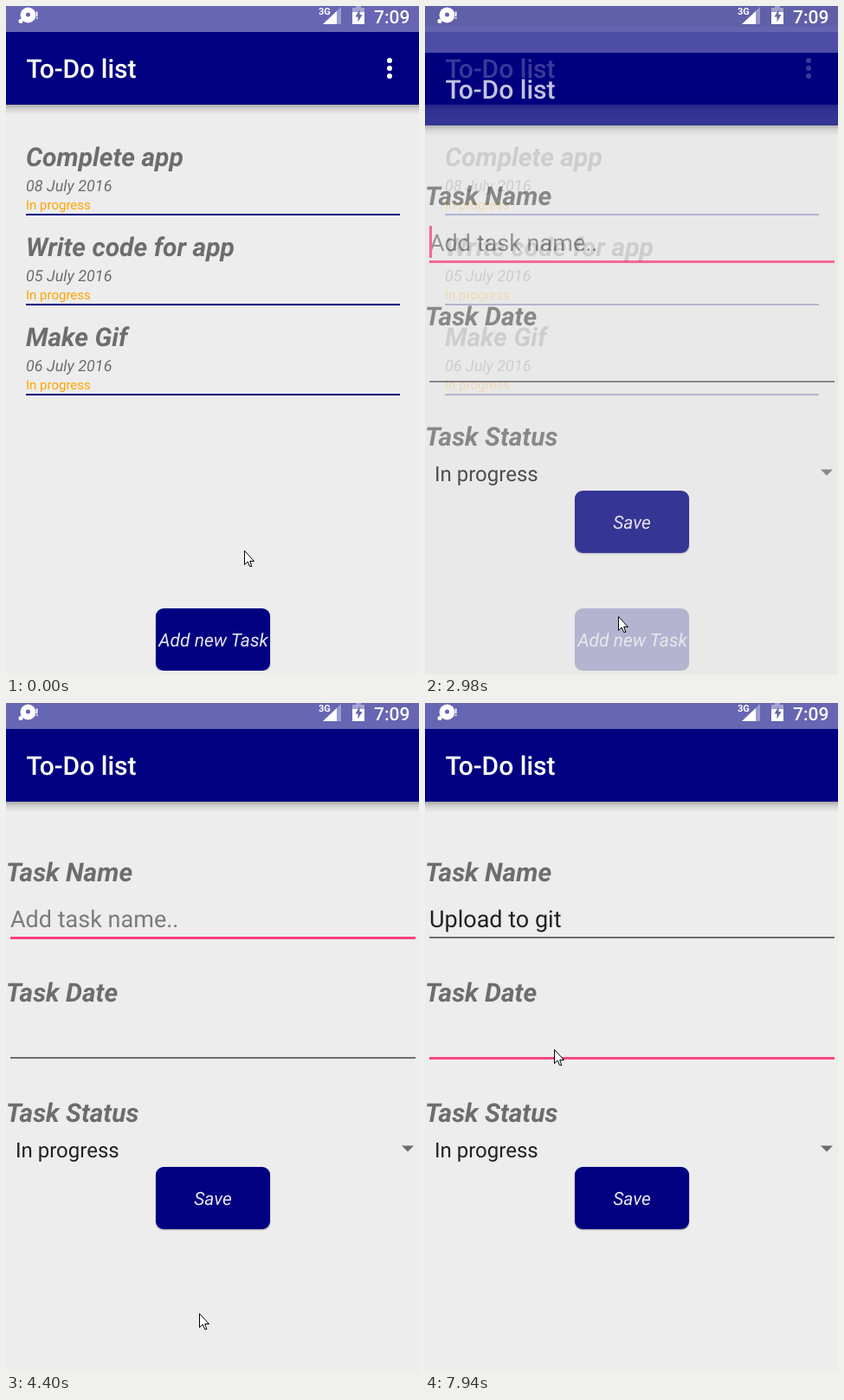
An HTML page for the animation above (8000 ms loop, 477 px wide and 773 px high).

```html
<!DOCTYPE html>
<html>
<head>
<meta charset="utf-8">
<style>
  html, body { margin: 0; width: 100%; height: 100%; overflow: hidden; background: #000; }
  svg { display: block; width: 477px; height: 773px; }
  text { font-family: Roboto, sans-serif; white-space: pre; text-rendering: geometricPrecision; }
  .bar { font-size: 30px; font-weight: 500; fill: #fff; }
  .head { font-size: 30px; font-weight: 700; font-style: italic; fill: #6d6d6d; }
  .date { font-size: 18px; font-style: italic; fill: #6d6d6d; }
  .state { font-size: 15px; fill: #ffa500; }
  .field { font-size: 27px; }
  .btn { font-size: 21px; font-style: italic; fill: #e6e6f0; text-anchor: middle; }
</style>
</head>
<body>
<svg viewBox="0 0 477 773">
  <defs>
    <linearGradient id="shade" x2="0" y2="1">
      <stop offset="0" stop-opacity=".3"/>
      <stop offset=".4" stop-opacity=".12"/>
      <stop offset="1" stop-opacity="0"/>
    </linearGradient>
    <clipPath id="above"><rect width="477" height="768"/></clipPath>
    <g id="window">
      <rect width="477" height="773" fill="#ededed"/>
      <rect y="114" width="477" height="12" fill="url(#shade)"/>
      <rect width="477" height="30" fill="#6666b3"/>
      <rect y="30" width="477" height="84" fill="#000080"/>
      <text class="bar" x="23.5" y="83">To-Do list</text>
    </g>
    <g id="button">
      <rect x="172.5" y="1" width="133" height="72.5" rx="9" opacity=".18"/>
      <rect x="173" width="132" height="72" rx="9" fill="#000080"/>
    </g>
  </defs>

  <g id="list">
    <use href="#window"/>
    <g fill="#fff">
      <circle cx="443" cy="63" r="3"/><circle cx="443" cy="72" r="3"/><circle cx="443" cy="81" r="3"/>
    </g>
    <g id="tasks"></g>
    <g clip-path="url(#above)">
      <rect id="press" x="172" y="740" width="134" height="30" rx="9" opacity=".25"/>
      <use href="#button" y="696"/>
    </g>
    <text class="btn" x="239.5" y="740">Add new Task</text>
  </g>

  <g id="form">
    <use href="#window"/>
    <text class="head" x="0" y="206">Task Name</text>
    <text class="head" x="0" y="345">Task Date</text>
    <text class="head" x="0" y="484">Task Status</text>
    <text class="field" id="name" x="5" y="259"></text>
    <rect id="caret" y="230" width="3" height="37" fill="#ff4081"/>
    <g fill="#6d6d6d">
      <rect x="5" y="270" width="468" height="2"/>
      <rect x="5" y="409" width="468" height="2"/>
      <path d="M457 511.500h14l-7 7z"/>
    </g>
    <g fill="#ff4081">
      <rect id="nameLine" x="5" y="270" width="468" height="3"/>
      <rect id="dateLine" x="5" y="409" width="468" height="3"/>
    </g>
    <text x="11" y="532" font-size="24" fill="#212121" dy="-7.500">In progress</text>
    <use href="#button" y="536"/>
    <text class="btn" x="239" y="580">Save</text>
  </g>

  <g fill="#fff">
    <circle cx="25.500" cy="10.500" r="9"/>
    <circle cx="17" cy="17.500" r="2.500"/>
    <circle cx="25.500" cy="10" r="2.500" fill="#6666b3"/>
    <text x="34" y="15" font-size="12" font-weight="700">!</text>
    <text x="361" y="10" font-size="11" font-weight="700">3G</text>
    <path d="M387 1V21H366z" opacity=".35"/>
    <path d="M382 6V21H366z"/>
    <path d="M404 0h6v2h4v6h-14v-6h4z" opacity=".4"/>
    <path d="M400 7h14v14h-14z"/>
    <path d="M408.500 4l-5 8.500h3v6l5-8.500h-3z" fill="#6666b3"/>
    <text x="425" y="19.500" font-size="21" font-weight="500">7:09</text>
  </g>

  <path id="cursor" d="M.5.5V16.500L4.200 13 6.500 18.500H8.800L6.700 12.500H11.500z" fill="#fff" stroke="#000" stroke-linejoin="round"/>
</svg>
<script>
const $ = id => document.getElementById(id);
const set = (id, key, value) => $(id).setAttribute(key, value);

$('tasks').innerHTML = [['Complete app', '08'], ['Write code for app', '05'], ['Make Gif', '06']]
  .map(([title, day], i) => `<g transform="translate(23 ${i * 104})">
    <text class="head" y="185">${title}</text>
    <text class="date" y="214">${day} July 2016</text>
    <text class="state" y="235">In progress</text>
    <rect y="240" width="432" height="2" fill="#000080"/></g>`).join('');

const LOOP = 8000, OPEN = 2920;
const TASK = 'Upload to git';
const keys = [4450, 4640, 4820, 5010, 5070, 5130, 5310, 5680, 5930, 6050, 6240, 6420, 6540];
const redraws = [2920, 2980, 3040, 3090, 3140];
const swing = [[223, 705], [236, 682], [249, 640], [238, 580], [205, 510],
               [160, 445], [120, 400], [98, 386], [122, 392], [149, 400]];

const clamp = v => Math.min(1, Math.max(0, v));
const mix = (a, b, p) => a + (b - a) * p;
const ease = p => p * p * (3 - 2 * p);

// Count of the n jumps, spread evenly over a..b, that have happened
const jumps = (t, a, b, n) =>
  t < a ? 0 : Math.min(n, 1 + Math.floor((t - a) / (b - a) * (n - 1) + 1e-6));

function cursorAt(t) {
  if (t >= 7040) return swing[jumps(t, 7040, 7510, 9)];
  if (t >= 2130) {
    const p = jumps(t, 2130, 2250, 3) / 3;
    return [mix(225, 223, p), mix(699, 705, p)];
  }
  const p = ease(jumps(t, 500, 1070, 10) / 10);
  return [mix(275, 225, p), mix(629, 699, p)];
}

function caretOn(t) {
  if (t >= 7880) return false;
  if (t >= 7510) return true;
  if (t >= 4450) return t < 7040;
  return t < 3400 || (t >= 3900 && t < 4400);
}

function draw(t) {
  const shown = redraws.filter(r => r <= t).pop() || 0;
  const age = Math.max(0, shown - OPEN);
  const settled = shown === 3140;
  const shift = settled ? 0 : Math.round(62 * (1 - age / 350) ** 5);
  set('form', 'opacity', settled ? 1 : 1 - (1 - clamp(age / 200)) ** 4);
  set('form', 'transform', `translate(0 ${shift})`);
  set('list', 'opacity', 1 - .3 * ease(clamp(age / 217)));
  set('press', 'visibility', t >= 2690 && t < OPEN ? 'visible' : 'hidden');

  const typed = TASK.slice(0, keys.filter(k => k <= t).length);
  const name = $('name');
  name.textContent = typed || 'Add task name..';
  set('name', 'fill', typed ? '#212121' : '#7b7b7b');
  set('caret', 'x', 5 + (typed ? Math.floor(name.getComputedTextLength()) : 0));
  set('caret', 'opacity', caretOn(t) ? 1 : 0);

  const focus = jumps(t, 7880, 7940, 2);
  set('nameLine', 'opacity', focus ? 0 : 1);
  set('dateLine', 'opacity', [0, .5, .92][focus]);

  set('cursor', 'transform', `translate(${cursorAt(t).map(Math.round)})`);
}

const start = performance.now();
function tick() {
  draw((performance.now() - start) % LOOP);
  requestAnimationFrame(tick);
}
tick();
</script>
</body>
</html>
```
